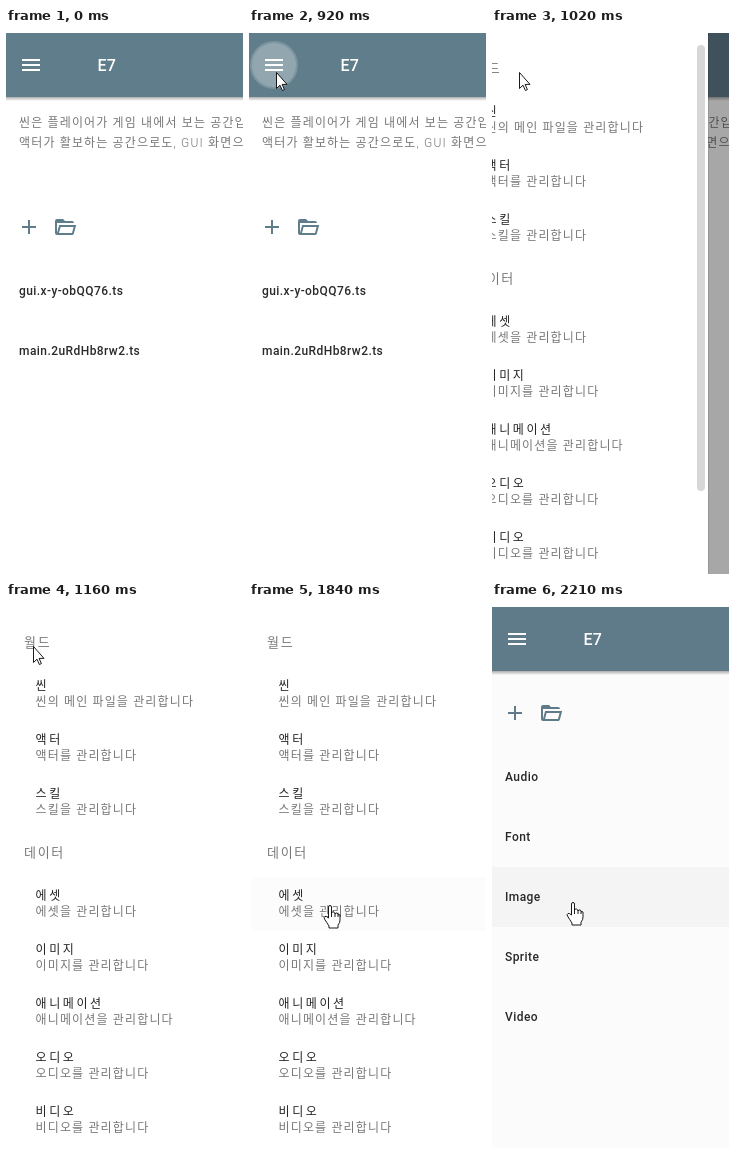
An HTML page for the animation above (2.55 s loop, 237 by 546 pixels).

```html
<!DOCTYPE html>
<html lang="ko">
<meta charset="utf-8">
<style>
  html, body { margin: 0; width: 100%; height: 100%; overflow: hidden; background: #fff; }
  svg { display: block; font-family: Roboto, "Noto Sans CJK KR", "Noto Sans CJK", sans-serif; }
  .head { font-size: 13px; letter-spacing: 1.7px; fill: #777; font-weight: 300; }
  .name { font-size: 12px; letter-spacing: 2.6px; fill: #222; font-weight: 300; }
  .note { font-size: 12px; letter-spacing: 1.16px; fill: #777; font-weight: 300; }
  .file { font-size: 12px; letter-spacing: .43px; fill: #2a2a2a; font-weight: 500; }
  .title { font-size: 16px; letter-spacing: .3px; fill: #fff; font-weight: 500; }
  .cursor { fill: #fff; stroke: #000; stroke-width: .9; }
</style>
<svg width="237" height="546" viewBox="0 0 237 546">
  <defs>
    <linearGradient id="shade" x2="0" y2="1">
      <stop stop-opacity=".32"/><stop offset="1" stop-opacity="0"/>
    </linearGradient>
    <clipPath id="rowClip"><rect y="275" width="253" height="54"/></clipPath>
    <g id="tools" fill="#607d8b">
      <path d="M30 13h-6v6h-2v-6h-6v-2h6V5h2v6h6z"/>
      <path transform="translate(47)" d="M6.1 10L4 18V8H21A2 2 0 0 0 19 6H12L10 4H4A2 2 0 0 0 2 6V18A2 2 0 0 0 4 20H19C19.9 20 20.7 19.4 20.9 18.5L23.2 10H6.1M19 18H6L7.6 12H20.6L19 18Z"/>
    </g>
  </defs>
  <rect width="237" height="546" fill="#fff"/>
  <g id="scenes"><use href="#tools" y="187"/></g>
  <g id="assets">
    <rect y="265" width="237" height="60" fill-opacity=".028"/>
    <use href="#tools" y="99"/>
  </g>
  <rect y="69" width="237" height="4" fill="url(#shade)"/>
  <rect y="5" width="237" height="64" fill="#607d8b"/>
  <g fill="#fff">
    <circle id="halo" cx="25" cy="37" r="24"/>
    <circle id="press" cx="25" cy="37"/>
    <path d="M16 31h18v2H16zM16 36h18v2H16zM16 41h18v2H16z"/>
  </g>
  <text class="title" x="91.5" y="43">E7</text>
  <rect id="scrim" y="5" width="237" height="541"/>
  <g id="drawer">
    <rect x="252" y="5" width="1" height="541" fill-opacity=".1"/>
    <rect y="5" width="252" height="541" fill="#fff"/>
    <rect x="241" y="17" width="8" height="446" rx="4" fill="#d7d7d7"/>
    <rect id="hover" x="2" width="249" height="54" rx="4" fill-opacity=".012"/>
    <g clip-path="url(#rowClip)">
      <circle id="glow" cx="120" cy="302" r="119"/>
      <circle id="ripple" cy="302"/>
    </g>
  </g>
  <g id="arrow" class="cursor"><path d="M.5 .5V16.5L4 13.2 6.4 18.5 8.4 17.6 6.1 12.4H11Z"/></g>
  <g id="hand" class="cursor">
    <path d="M-1.5 12V1A1.5 1.5 0 0 1 1.5 1V7Q2 5.5 3.5 6T5 8Q5.5 6.5 7 7T8 9Q9 8 10 9V14Q10 17 8 19V22H-1V20Q-3 17 -5.5 13Q-6.5 11 -5 10.5T-1.5 12Z"/>
    <path d="M1.5 7V11M5 8V11M8 9V11" fill="none"/>
  </g>
</svg>
<script>
const $ = id => document.getElementById(id);
const set = (id, attrs) => { for (const k in attrs) $(id).setAttribute(k, attrs[k]); };
const show = (id, on) => set(id, { visibility: on ? 'visible' : 'hidden' });

function text(parent, cls, x, y, str) {
  const el = document.createElementNS('http://www.w3.org/2000/svg', 'text');
  el.setAttribute('class', cls);
  el.setAttribute('x', x);
  el.setAttribute('y', y);
  el.textContent = str;
  $(parent).append(el);
}

text('scenes', 'note', 13, 99, '씬은 플레이어가 게임 내에서 보는 공간입니다');
text('scenes', 'note', 13, 119, '액터가 활보하는 공간으로도, GUI 화면으로도');
text('scenes', 'file', 13, 267, 'gui.x-y-obQQ76.ts');
text('scenes', 'file', 13, 327, 'main.2uRdHb8rw2.ts');
['Audio', 'Font', 'Image', 'Sprite', 'Video'].forEach((s, i) => text('assets', 'file', 13, 179 + 60 * i, s));

function section(y, title, items) {
  text('drawer', 'head', 18, y, title);
  items.forEach(([name, note], i) => {
    text('drawer', 'name', 29.5, y + 43 + 54 * i, name);
    text('drawer', 'note', 29.5, y + 59 + 54 * i, note + ' 관리합니다');
  });
}
section(45, '월드', [['씬', '씬의 메인 파일을'], ['액터', '액터를'], ['스킬', '스킬을']]);
section(255, '데이터', [['에셋', '에셋을'], ['이미지', '이미지를'], ['애니메이션', '애니메이션을'],
  ['오디오', '오디오를'], ['비디오', '비디오를']]);

const ramp = (t, start, length) => Math.min(1, Math.max(0, (t - start) / length));

// cubic-bezier(.4, 0, .2, 1), solved by bisection
function ease(x) {
  let lo = 0, hi = 1;
  for (let i = 0; i < 20; i++) {
    const s = (lo + hi) / 2, r = 1 - s;
    if (1.2 * r * r * s + .6 * r * s * s + s ** 3 < x) lo = s; else hi = s;
  }
  return lo * lo * (3 - 2 * lo);
}

// time, x, y of the pointer
const path = [
  [230, 229, 321], [330, 145, 185], [410, 75, 100], [490, 36, 60], [570, 22, 50], [670, 27, 44],
  [1180, 27, 44], [1250, 33, 62], [1320, 44, 96], [1440, 59, 235], [1520, 72, 300], [1620, 80, 334],
  [1720, 81, 322], [1860, 81, 301], [2550, 81, 301]
];
function pointer(t) {
  const i = Math.max(1, path.findIndex(p => p[0] >= t));
  const [a, b] = [path[i - 1], path[i]];
  const k = ramp(t, a[0], b[0] - a[0]);
  return [a[1] + (b[1] - a[1]) * k, a[2] + (b[2] - a[2]) * k];
}
const rowTop = y => y >= 65 && y < 227 ? 65 + 54 * Math.floor((y - 65) / 54)
  : y >= 275 ? 275 + 54 * Math.floor((y - 275) / 54) : null;

function draw() {
  const t = performance.now() % 2550;
  const late = t > 1500;
  show('scenes', !late);
  show('assets', late);

  const tap = ease(ramp(t, 800, 135));
  const tapFade = 1 - ramp(t, 960, 120);
  set('halo', { 'fill-opacity': .18 * ramp(t, 800, 50) * tapFade });
  set('press', { r: 12 + 10 * tap, 'fill-opacity': .16 * ramp(t, 800, 45) * tapFade });

  const open = ease(ramp(t, 934, 150)) - ease(ramp(t, 2113, 92));
  set('drawer', { transform: `translate(${Math.round(253 * (open - 1))})` });
  show('drawer', open > 0);
  set('scrim', { 'fill-opacity': Math.max(late ? .016 : 0, .4 * open) });

  const row = rowTop(pointer(t - 40)[1]);
  show('hover', open > 0 && row !== null && t < 1880);
  set('hover', { y: row || 0 });
  const spread = ease(ramp(t, 1960, 135));
  set('glow', { 'fill-opacity': .06 * ramp(t, 1880, 80) });
  set('ripple', { cx: 81 + 39 * spread, r: 40 + 79 * spread, 'fill-opacity': .2 * ramp(t, 1960, 45) });

  const [x, y] = pointer(t);
  const onRow = t < 700 ? y > 233 : rowTop(y) !== null;
  const transform = `translate(${Math.round(x)} ${Math.round(y)})`;
  set('arrow', { transform });
  set('hand', { transform });
  show('arrow', t >= 230 && !onRow);
  show('hand', t >= 230 && onRow);
  requestAnimationFrame(draw);
}
draw();
</script>
</html>
```
